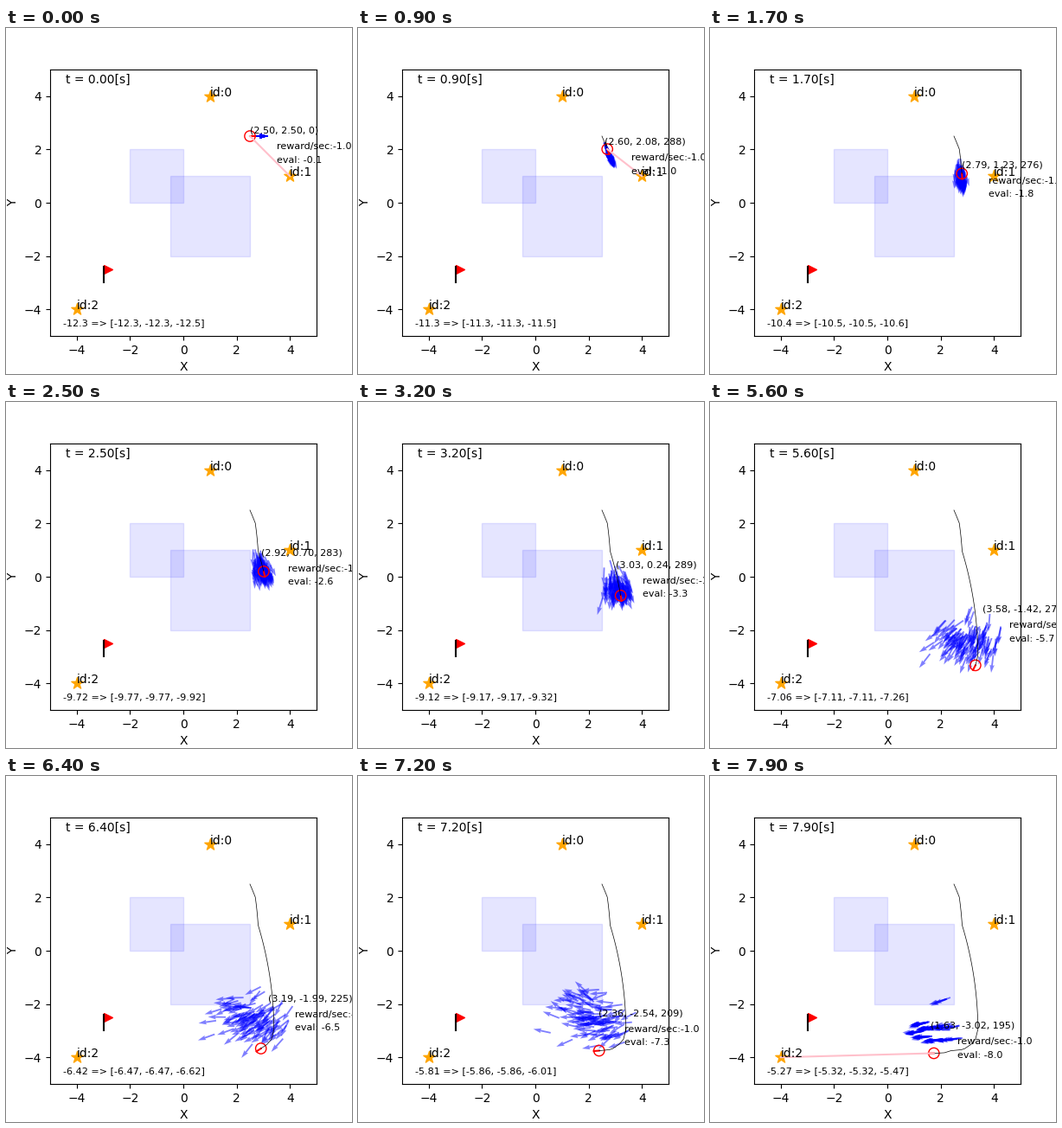
Write a matplotlib script that moves like this. It is 400 by 400 pixels and loops after 8 s.

```python
import numpy as np
import matplotlib.pyplot as plt
from matplotlib.animation import FuncAnimation
from matplotlib.patches import Circle, Rectangle

FRAMES, DT = 80, 0.1
N, RADIUS = 100, 0.2
LANDMARKS = [(1, 4), (4, 1), (-4, -4)]

# Actions per time step: F forward, L and R turn, with repeat counts
PLAN = "R5 F4 R F8 L F30 R F3 R L R2 F2 R F2 R L R F R F3 R L2 F2 R F3"
ACTIONS = "".join(p[0] * int(p[1:] or 1) for p in PLAN.split())
TURN, DRIFT = 13.3, -0.55         # degrees per turn step, per forward step
REAL_STEP, MODEL_STEP = 0.132, 0.103

# Key points of the best guess and its value
KEY_T = [0, 0.5, 1.7, 3.2, 4.3, 5.6, 6.4, 7.9]
GUESS_X = [2.50, 2.50, 2.79, 3.03, 3.35, 3.58, 3.19, 1.63]
GUESS_Y = [2.50, 2.50, 1.23, 0.24, -0.65, -1.42, -1.99, -3.02]
GUESS_DEG = [0, -66, -84, -71, -67, -85, -135, -165]
VALUE = [-12.29, -11.7, -10.4, -9.12, -8.31, -7.06, -6.42, -5.27]
VALUE_GAPS = (0, 0.05, 0.05, 0.2)

rng = np.random.default_rng(11)


def move(pose, action, step, noise=0.0):
    """Advance rows of x, y, degrees by one action."""
    jitter = noise * rng.normal(size=(2, len(pose)))
    x, y, deg = pose.T
    if action == "F":
        dist = step + 0.06 * jitter[0]
        turn = DRIFT + 2.3 * jitter[1]
    else:
        dist = 0
        turn = (TURN if action == "L" else -TURN) + 3 * jitter[1]
    a = np.radians(deg + turn / 2)
    return np.column_stack([x + dist * np.cos(a), y + dist * np.sin(a), deg + turn])


def observe(pose, mark):
    """Distance and relative bearing from each pose to a landmark."""
    dx, dy = mark[0] - pose[:, 0], mark[1] - pose[:, 1]
    bearing = np.degrees(np.arctan2(dy, dx)) - pose[:, 2]
    return np.hypot(dx, dy), (bearing + 180) % 360 - 180


def visible(pose):
    for mark in LANDMARKS:
        dist, bearing = observe(pose, mark)
        if 0.5 <= dist[0] <= 6 and abs(bearing[0]) <= 60:
            yield mark


def resample(cloud, robot, mark):
    (d0, b0), (d, b) = observe(robot, mark), observe(cloud, mark)
    error = ((d - d0) / (0.14 * d0)) ** 2 + ((b - b0) / 4) ** 2
    total = np.cumsum(np.exp(-error / 2) + 1e-300)
    picks = (np.arange(N) + rng.random()) / N * total[-1]
    return cloud[np.minimum(np.searchsorted(total, picks), N - 1)]


def simulate():
    robot = np.array([[2.5, 2.5, 0.0]])
    cloud = np.repeat(robot, N, axis=0)
    robots, clouds = [robot], [cloud]
    for action in ACTIONS:
        robot = move(robot, action, REAL_STEP)
        cloud = move(cloud, action, MODEL_STEP, noise=1)
        for mark in visible(robot):
            cloud = resample(cloud, robot, mark)
        robots.append(robot)
        clouds.append(cloud)
    return np.vstack(robots), clouds


poses, clouds = simulate()

fig = plt.figure(figsize=(4, 4), dpi=100)
ax = fig.add_subplot(111)
ax.set_aspect("equal")
ax.set_xlim(-5, 5)
ax.set_ylim(-5, 5)
ax.set_xlabel("X", fontsize=10)
ax.set_ylabel("Y", fontsize=10)

for corner, w, h in [((-2, 0), 2, 2), ((-0.5, -2), 3, 3)]:
    ax.add_patch(Rectangle(corner, w, h, color="blue", alpha=0.1, zorder=1.2))
for i, (x, y) in enumerate(LANDMARKS):
    ax.scatter(x, y, s=100, marker="*", color="orange")
    ax.text(x, y, f"id:{i}", fontsize=10)
ax.scatter(-2.84, -2.5, s=50, marker=">", color="red")
ax.plot([-3, -3], [-3, -2.4], color="black")

arrows = ax.quiver(*clouds[0].T[:2], np.ones(N), np.zeros(N),
                   angles="xy", scale_units="xy", scale=1.5,
                   color="blue", alpha=0.5)
body = ax.add_patch(Circle((0, 0), RADIUS, fill=False, color="red", zorder=1.5))
nose, = ax.plot([], [], color="red")
trail, = ax.plot([], [], color="black", linewidth=0.5)
beam, = ax.plot([], [], color="pink")

clock = ax.text(-4.4, 4.5, "", fontsize=10)
value_text = ax.text(-4.5, -4.6, "", fontsize=8)
pose_text, reward_text, eval_text = (ax.text(0, 0, "", fontsize=8) for _ in range(3))
reward_text.set_text("reward/sec:-1.0")


def update(k):
    t = k * DT
    x, y, deg = poses[k]
    a = np.radians(deg)
    body.center = x, y
    nose.set_data([x, x + RADIUS * np.cos(a)], [y, y + RADIUS * np.sin(a)])
    trail.set_data(poses[:k + 1, 0], poses[:k + 1, 1])

    rays = [p for mark in visible(poses[k:k + 1]) for p in ((x, y), mark)]
    beam.set_data(*np.reshape(rays, (-1, 2)).T)

    heading = np.radians(clouds[k][:, 2])
    arrows.set_offsets(clouds[k][:, :2])
    arrows.set_UVC(np.cos(heading), np.sin(heading))

    gx, gy, gdeg, value = (np.interp(t, KEY_T, row)
                           for row in (GUESS_X, GUESS_Y, GUESS_DEG, VALUE))
    pose_text.set_position((gx, gy + 0.1))
    pose_text.set_text(f"({gx:.2f}, {gy:.2f}, {round(gdeg) % 360})")
    reward_text.set_position((gx + 1, gy - 0.5))
    eval_text.set_position((gx + 1, gy - 1))
    eval_text.set_text(f"eval: {-(k + 1) * DT:.1f}")

    clock.set_text(f"t = {t:.2f}[s]")
    value_text.set_text("{:.3} => [{:.3}, {:.3}, {:.3}]".format(
        *(float(value - gap) for gap in VALUE_GAPS)))
    return []


anim = FuncAnimation(fig, update, frames=FRAMES, interval=100, repeat=True)
plt.show()
```
